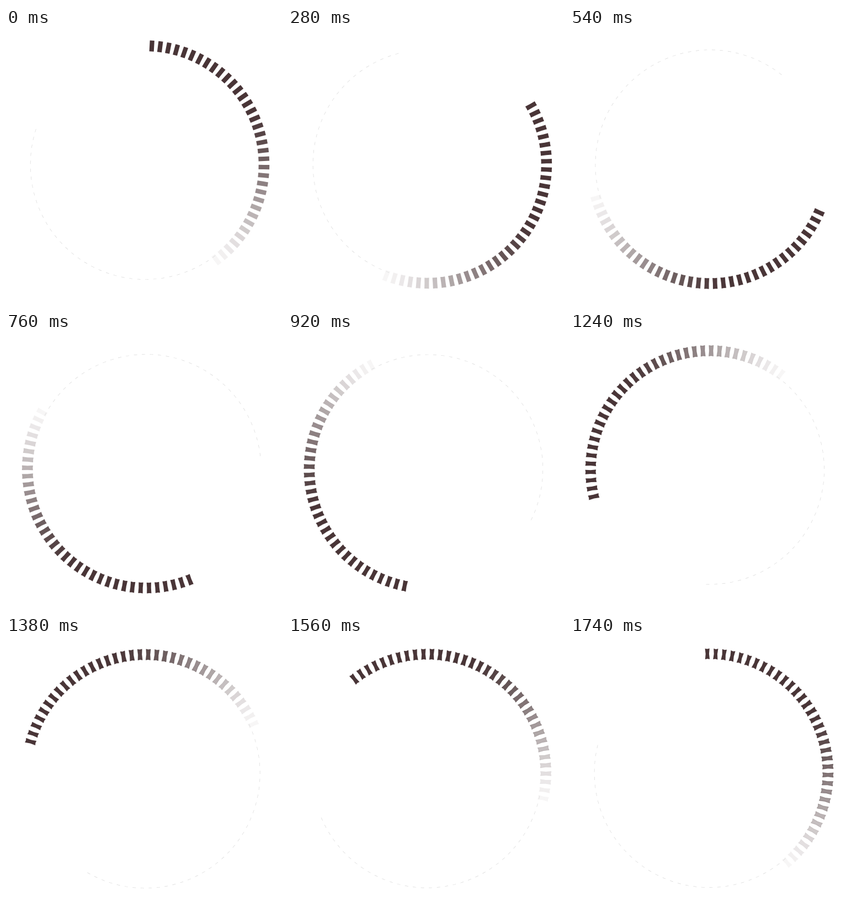
These frames come from a looping animation (500 px wide and 500 px high, 1760 ms). An HTML page:

```html
<!DOCTYPE html>
<html lang="en">
<head>
<meta charset="utf-8">
<title>Dashed ring spinner</title>
<style>
  html, body { margin: 0; width: 100%; height: 100%; overflow: hidden; background: #fff; }
  svg { display: block; width: 100%; height: 100%; }
</style>
</head>
<body>
<svg viewBox="0 0 500 500"><g id="ring"></g></svg>
<script>
  const STEP_MS = 20, STEPS = 88;
  const PIVOT = [253, 248.2];
  const CENTER = [252.2, 247.5]; // slightly off the pivot, so the ring wobbles
  const START = 3.2, PITCH = 4;
  const SOLID = 36, TRACE_END = 71;
  const RADIUS = 215.2, TRACE_RADIUS = 208;
  const DARK = [73, 53, 55];

  const ring = document.getElementById('ring');

  // dark for the first dashes, then an eased fade to white
  function shade(i) {
    const x = Math.max(0, (i - 14) / 24);
    const f = x * x * (3 - 2 * x);
    return `rgb(${DARK.map(c => Math.round(c + (255 - c) * f))})`;
  }

  // a bar that narrows at the waist and is notched at both ends
  function barPath(width, height, pinch) {
    const w = width / 2, h = height / 2, waist = w - pinch, tip = h - pinch;
    return `M${-w} ${-h}L0 ${-tip}L${w} ${-h}L${waist} 0L${w} ${h}L0 ${tip}L${-w} ${h}L${-waist} 0Z`;
  }

  function addBar(i, radius, attrs) {
    const bar = document.createElementNS('http://www.w3.org/2000/svg', 'path');
    const [cx, cy] = CENTER;
    attrs.transform = `translate(${cx} ${cy}) rotate(${START + PITCH * i}) translate(0 ${-radius})`;
    for (const name in attrs) bar.setAttribute(name, attrs[name]);
    ring.append(bar);
    return bar;
  }

  const dashes = Array.from({ length: SOLID }, (_, i) =>
    addBar(i, RADIUS, { fill: shade(i), stroke: '#1c0c0c', 'stroke-width': 0.9 }));

  // faint inner trace behind the fading end
  for (let i = SOLID - 1; i <= TRACE_END; i++) {
    addBar(i, TRACE_RADIUS, { d: barPath(6, 0.7, 0), fill: '#d9d9d9' });
  }

  // dashes wear in over the loop: a pinched outline and darker edges
  function wear(age) {
    const d = barPath(8.2, 19.6, age);
    dashes.forEach((dash, i) => {
      dash.setAttribute('d', d);
      dash.setAttribute('stroke-opacity', 0.5 * age * Math.sin(Math.PI * i / SOLID) ** 2);
    });
  }

  function draw() {
    const step = Math.floor(performance.now() / STEP_MS) % STEPS;
    ring.setAttribute('transform', `rotate(${step * 360 / STEPS} ${PIVOT})`);
    wear(step / STEPS);
    requestAnimationFrame(draw);
  }
  draw();
</script>
</body>
</html>
```
